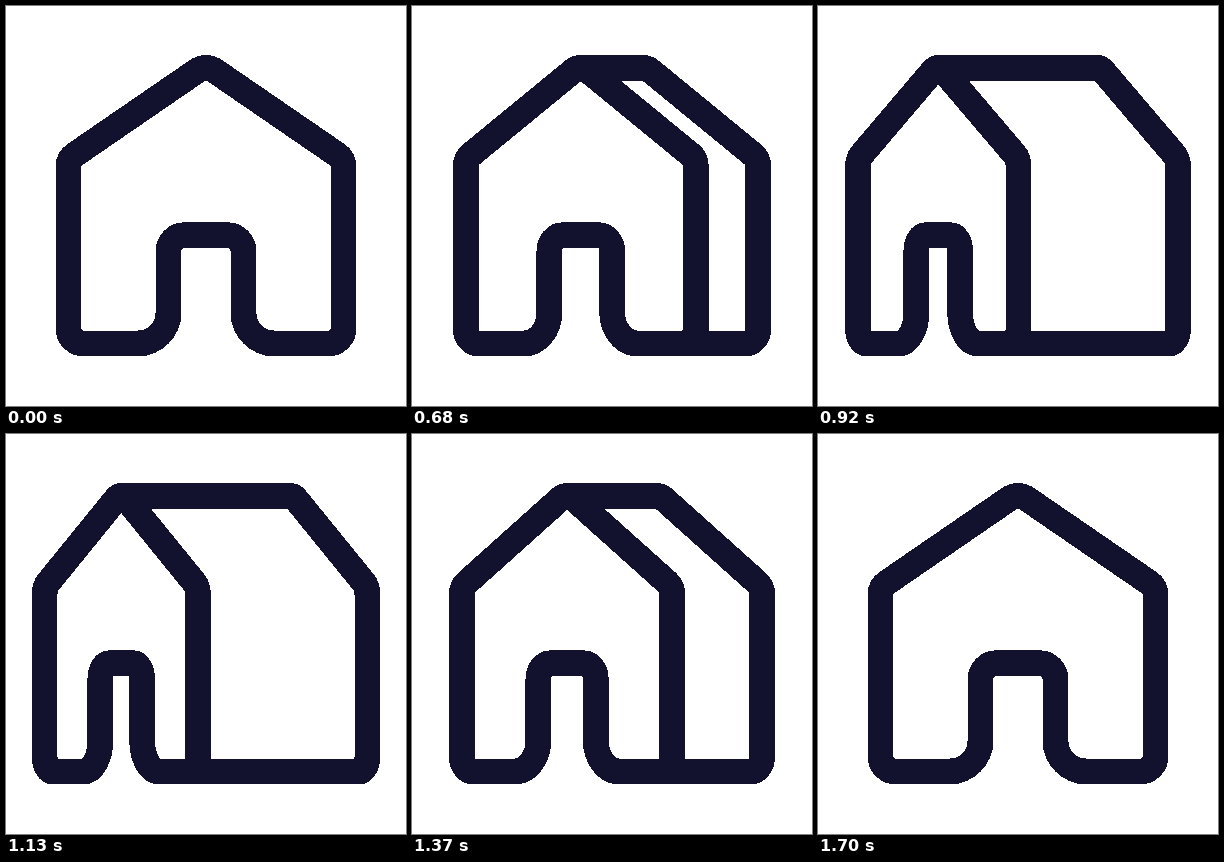
Animation, 400 px wide and 400 px high, one loop 1730 ms. Source, as an HTML page:

```html
<!DOCTYPE html>
<html lang="en">
<head>
<meta charset="utf-8">
<title>House icon</title>
<style>
  html, body { margin: 0; width: 100%; height: 100%; overflow: hidden; background: #fff; }
  svg { display: block; width: 100%; height: 100%; }
  path {
    fill: none; stroke: #12122f; stroke-width: 25.8; stroke-linejoin: round;
    shape-rendering: crispEdges;
  }
</style>
</head>
<body>
<svg viewBox="0 0 400 400">
  <path id="side"></path>
  <path id="front"></path>
</svg>
<script>
const LOOP = 1730, REST = 530, STEP = 30, TURN_STEPS = 20;
const HALF = 137.5, TOP = 62, BOTTOM = 337.5, DOOR_TOP = 229.2;
const side = document.getElementById('side');
const front = document.getElementById('front');

// Cubic Bezier easing with control points (x1, 0) and (x2, 1).
function ease(x, x1, x2) {
  let lo = 0, hi = 1;
  for (let i = 0; i < 30; i++) {
    const t = (lo + hi) / 2, u = 1 - t;
    if (3 * u * u * t * x1 + 3 * u * t * t * x2 + t * t * t < x) lo = t;
    else hi = t;
  }
  return lo * lo * (3 - 2 * lo);
}

function turnAt(ms) {
  if (ms < REST) return 0;
  const step = Math.floor((ms - REST) / STEP) + 1;
  return step <= TURN_STEPS
    ? ease(step / TURN_STEPS, 0.4, 0.2)
    : 1 - ease(Math.min(1, step / TURN_STEPS - 1), 0.534, 0.364);
}

// Right half of the outline, from the roof ridge down to the floor corner.
function rightHalf(x) {
  return `Q${x(5)} ${TOP} ${x(9)} 64.8 L${x(131.1)} 148.6
    Q${x(HALF)} 153 ${x(HALF)} 160.8 V${BOTTOM - 15}`;
}

function draw(ms) {
  const p = turnAt(ms);
  const scale = 1 - p * 61 / HALF;
  const ridge = 200 - 85 * p;
  const x = d => ridge + d * scale;
  const mirrored = d => 400 - ridge + d * scale;
  const arc = (r, sweep, toX, toY) => `A${r * scale} ${r} 0 0 ${sweep} ${toX} ${toY}`;

  front.setAttribute('d', `M${x(0)} ${TOP} ${rightHalf(x)}
    ${arc(15, 1, x(HALF - 15), BOTTOM)} H${x(68.5)}
    ${arc(31, 1, x(37.5), BOTTOM - 31)} V${DOOR_TOP + 16}
    ${arc(16, 0, x(21.5), DOOR_TOP)} H${x(-21.5)}
    ${arc(16, 0, x(-37.5), DOOR_TOP + 16)} V${BOTTOM - 31}
    ${arc(31, 1, x(-68.5), BOTTOM)} H${x(15 - HALF)}
    ${arc(15, 1, x(-HALF), BOTTOM - 15)} V160.8
    Q${x(-HALF)} 153 ${x(-131.1)} 148.6 L${x(-9)} 64.8
    Q${x(-5)} ${TOP} ${x(0)} ${TOP} Z`);

  side.setAttribute('d', `M${x(0)} ${TOP} H${mirrored(0)} ${rightHalf(mirrored)}
    ${arc(15, 1, mirrored(HALF - 15), BOTTOM)} H${x(HALF - 15)}`);
}

const start = performance.now();
function tick() {
  draw((performance.now() - start) % LOOP);
  requestAnimationFrame(tick);
}
tick();
</script>
</body>
</html>
```
